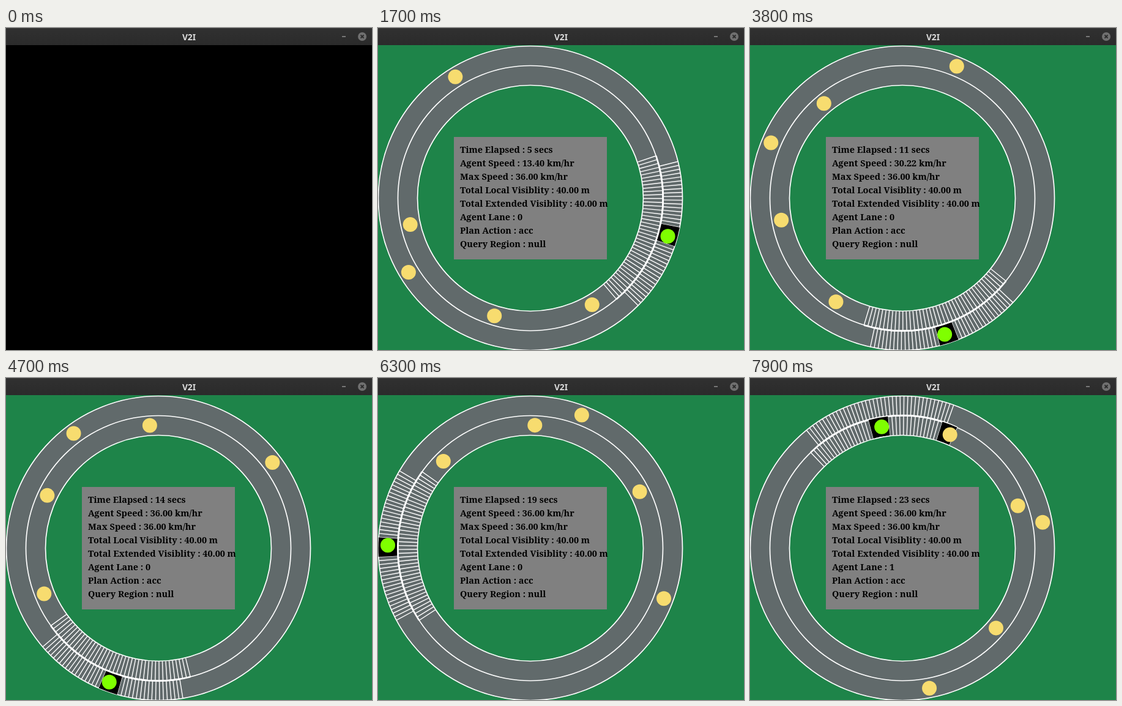
These frames come from a looping animation (598 by 526 pixels, 8000 ms). An HTML page with a canvas:

```html
<!DOCTYPE html>
<html lang="en">
<head>
<meta charset="utf-8">
<title>V2I</title>
<style>
  html, body { margin: 0; width: 100%; height: 100%; overflow: hidden; background: #000; }
  canvas { position: absolute; left: 0; top: 0; }
  #bar {
    position: absolute; left: 0; top: 0; width: 598px; height: 28px;
    background: linear-gradient(#3a3a3a 0 1px, #303030 1px, #2b2b2b);
    color: #dadada; font: bold 13.8px/29px "Noto Sans", sans-serif; text-align: center;
  }
  #bar svg { position: absolute; left: 0; top: 0; }
  #info {
    position: absolute; left: 124px; top: 178px; width: 240px; height: 190px; margin: 0;
    padding: 10px 0 0 10px; background: #808080; color: #000;
    font: bold 14.45px/22px "Noto Serif", serif;
  }
</style>
</head>
<body>
<canvas id="stage" width="598" height="526"></canvas>
<pre id="info"></pre>
<div id="bar">V2I
  <svg width="598" height="28">
    <path d="M549 14h6" stroke="#777" stroke-width="2"/>
    <circle cx="582" cy="14" r="7" fill="#707070"/>
    <path d="M579.5 11.5l5 5m0-5l-5 5" stroke="#2b2b2b" stroke-width="1.8"/>
  </svg>
</div>
<script>
const ctx = document.getElementById('stage').getContext('2d');
const info = document.getElementById('info');
const CX = 249, CY = 278, RAD = Math.PI / 180;
const LANES = [233, 201];           // centre radius of outer and inner lane
const HALF = 16, CELLS = 40, CELL = 342.6;
const LOOP = 8, MAX_SPEED = 36, LANE_CHANGE = 20.17, TOP_SPEED_AT = 13.333;

// Playback seconds, simulated seconds, and travel (degrees on the outer lane) of the traffic
const PLAY = [0, 1.7, 2.7, 3.8, 4.7, 6.3, 7.9];
const SIM = [0, 4.963, 7.9815, 11.1926, 13.83, 18.51, 23.24];
const TRAVEL = [0, 13.9, 35.65, 68.05, 98.75, 156.3, 214.75];
const TRAFFIC = [[0, 224.35], [0, 134.8], [1, 151.5], [1, 90.9], [1, 43.8]];

function segment(xs, x) {
  let i = 0;
  while (i < xs.length - 2 && x > xs[i + 1]) i++;
  return i;
}

function linear(xs, ys, x) {
  const i = segment(xs, x);
  return ys[i] + (ys[i + 1] - ys[i]) * (x - xs[i]) / (xs[i + 1] - xs[i]);
}

// Smooth curve through the points, starting at rest
function smooth(xs, ys, x) {
  const step = i => xs[i + 1] - xs[i];
  const slope = i => (ys[i + 1] - ys[i]) / step(i);
  const tangent = i => i === 0 ? 0 : i === xs.length - 1 ? slope(i - 1)
    : (step(i) * slope(i - 1) + step(i - 1) * slope(i)) / (step(i - 1) + step(i));
  const i = segment(xs, x), h = step(i), u = (x - xs[i]) / h, v = 1 - u;
  return ys[i] * v * v * (1 + 2 * u) + ys[i + 1] * u * u * (1 + 2 * v)
    + h * u * v * (tangent(i) * v - tangent(i + 1) * u);
}

function agentAngle(s) {
  const ramp = Math.min(s, TOP_SPEED_AT);
  const inner = Math.max(0, s - LANE_CHANGE);
  return 1.46 + 0.569 * ramp * ramp + 15.17 * (s - ramp - inner) + 17.58 * inner;
}

function disc(x, y, r, color) {
  ctx.fillStyle = color;
  ctx.beginPath();
  ctx.arc(x, y, r, 0, 7);
  ctx.fill();
}

function arc(r, width, from = 0, to = 360) {
  ctx.lineWidth = width;
  ctx.beginPath();
  ctx.arc(CX, CY, r, from * RAD, to * RAD);
  ctx.stroke();
}

function drawGrid(lane, agent, cars) {
  const r = LANES[lane], size = CELL / r, start = agent - size * CELLS / 2;
  const low = r - HALF, high = r + HALF;
  ctx.lineWidth = 1.4;
  ctx.beginPath();
  for (let i = 0; i <= CELLS; i++) {
    const a = (start + i * size) * RAD, c = Math.cos(a), s = Math.sin(a);
    ctx.moveTo(CX + low * c, CY + low * s);
    ctx.lineTo(CX + high * c, CY + high * s);
  }
  ctx.stroke();
  arc(216.7, 2.6, start, start + CELLS * size);

  for (const car of cars) {
    if (car.lane !== lane) continue;
    const gap = (car.angle - agent + 540) % 360 - 180;
    const first = Math.floor(gap / size + CELLS / 2 - 2.5 + 1e-6);
    const a = Math.max(0, first), b = Math.min(CELLS, first + 5);
    if (a >= b) continue;
    ctx.fillStyle = '#000';
    ctx.beginPath();
    ctx.arc(CX, CY, high - 0.5, (start + a * size) * RAD, (start + b * size) * RAD);
    ctx.arc(CX, CY, low + 0.5, (start + b * size) * RAD, (start + a * size) * RAD, true);
    ctx.fill();
  }
}

function draw(t) {
  const running = t > 0;
  info.style.display = running ? '' : 'none';
  ctx.fillStyle = running ? '#1e8449' : '#000';
  ctx.fillRect(0, 0, 598, 526);
  if (!running) return;

  const s = linear(PLAY, SIM, t);
  const travel = smooth(SIM, TRAVEL, s);
  const agent = { lane: s < LANE_CHANGE ? 0 : 1, angle: agentAngle(s), color: '#7fff00' };
  const cars = TRAFFIC.map(([lane, from]) => (
    { lane, angle: from + travel * LANES[0] / LANES[lane], color: '#f7dc6f' }));
  cars.push(agent);

  disc(CX, CY, 249, '#616a6b');
  disc(CX, CY, 185, '#1e8449');
  ctx.strokeStyle = '#fff';
  for (const r of [248.5, 216.5, 184.5]) arc(r, 1.7);
  for (const lane of [0, 1]) drawGrid(lane, agent.angle, cars);
  for (const { lane, angle, color } of cars) {
    const r = LANES[lane], a = angle * RAD;
    disc(CX + r * Math.cos(a), CY + r * Math.sin(a), 12, color);
  }

  const speed = Math.min(MAX_SPEED, 2.7 * s);
  info.textContent = [
    `Time Elapsed : ${Math.round(s)} secs`,
    `Agent Speed : ${speed.toFixed(2)} km/hr`,
    `Max Speed : ${MAX_SPEED.toFixed(2)} km/hr`,
    'Total Local Visiblity : 40.00 m',
    'Total Extended Visiblity : 40.00 m',
    `Agent Lane : ${agent.lane}`,
    'Plan Action : acc',
    'Query Region : null'
  ].join('\n');
}

const begin = performance.now();
function tick() {
  const t = (performance.now() - begin) / 1000 % LOOP;
  draw(Math.floor(t * 10 + 1e-6) / 10);   // ten pictures a second
  requestAnimationFrame(tick);
}
tick();
</script>
</body>
</html>
```
